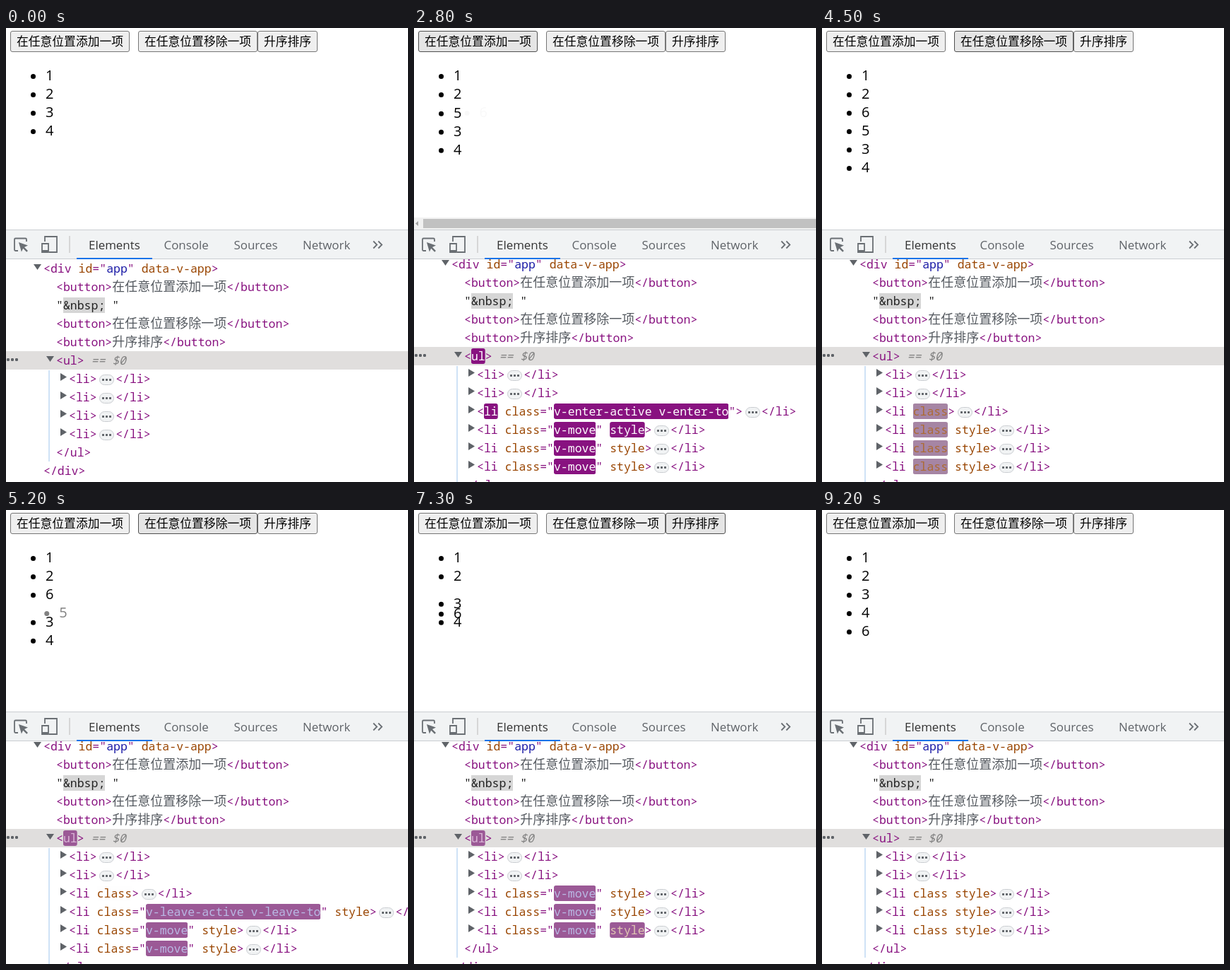
An HTML page that plays this animation: 569x642 px, repeating every 9.5 s.

```html
<!DOCTYPE html>
<html lang="zh">
<head>
<meta charset="utf-8">
<title>List transitions</title>
<style>
html, body { margin: 0; width: 100%; height: 100%; overflow: hidden; background: #fff; }
body { position: relative; }
body * { box-sizing: border-box; }
button, #list div, #bar, #bar span, #tree, .row, .tri, #guide, #scroll, #scroll *, svg { position: absolute; }
button { top: 4px; height: 30px; padding: 0 0 2px; border: 1px solid #767676; border-radius: 3px;
  background: #efefef; color: #000; font: 16.8px/26px "Noto Sans CJK SC", "Noto Sans CJK", sans-serif; white-space: nowrap; }
button.hover { background: #e5e5e5; border-color: #4f4f4f; }
button.down { background: #f5f5f5; border-color: #8d8d8d; }
#list div { left: 56px; height: 26px; font: 20px/26px "Open Sans", "Noto Sans", sans-serif; color: #000; }
#list div::before { content: ""; position: absolute; left: -21px; top: 11px; width: 7px; height: 7px; border-radius: 50%; background: currentColor; }
#scroll { left: 0; top: 268px; width: 569px; height: 17px; background: #f1f1f1; }
#scroll b { left: 13px; top: 2px; width: 556px; height: 13px; background: #c1c1c1; }
#scroll i { left: 2px; top: 5px; width: 4px; height: 7px; background: #a3a3a3; clip-path: polygon(100% 0, 100% 100%, 0 50%); }
#bar { left: 0; top: 285px; width: 569px; height: 42px; background: #f1f3f4; border: solid #cacdd1; border-width: 1px 0; }
#bar span { top: 0; font: 16.9px/41px "Open Sans", "Noto Sans", sans-serif; color: #5f6368; }
#bar span:first-of-type { color: #333; }
#bar svg { left: 0; top: -1px; }
#tree { left: 0; top: 327px; width: 569px; height: 315px; overflow: hidden; }
.row { left: 0; width: 800px; height: 26px; white-space: pre; color: #881280; font: 16.5px/26px "Noto Sans Mono", "DejaVu Sans Mono", monospace; }
.row > * { line-height: 0; }
.row .cjk { font: 300 18px/0 "Noto Sans CJK SC", "Noto Sans CJK", sans-serif; color: #555a60; }
.sel { background: #e0dedd; }
.sel em { color: #808080; }
.attr { color: #994500; }
.val { color: #1a1aa6; }
.txt { color: #222; }
.ent { background: #d6d6d6; clip-path: inset(1px 0 0); }
.mark { clip-path: inset(1px 0 0 round 3px); }
.tri { background: #5f6368; }
.tri.open { margin-left: -14px; top: 7px; width: 11px; height: 8px; clip-path: polygon(0 0, 100% 0, 50% 100%); }
.tri.shut { margin-left: -12px; top: 5px; width: 9px; height: 11px; clip-path: polygon(0 0, 100% 50%, 0 100%); }
.pill { display: inline-block; width: 21px; height: 15px; margin: 0 2px 0 3.5px; padding: 0 2px; vertical-align: -3px;
  border: 1px solid #cacdd1; border-radius: 8px;
  background: radial-gradient(circle, #5f6368 1.3px, transparent 2px) 0 50% / 5px 5px repeat-x content-box, #f1f3f4; }
.more { position: absolute; left: 0; top: 9px; width: 18px; height: 6px; background: radial-gradient(circle, #5f6368 1.9px, transparent 2.5px) 0 0 / 6px 6px; }
#guide { left: 60px; width: 2px; background: #cfe2f6; }
</style>
</head>
<body>
<button style="left:6px;width:169px">在任意位置添加一项</button>
<button style="left:187px;width:169px">在任意位置移除一项</button>
<button style="left:356px;width:85px">升序排序</button>
<div id="list"></div>
<div id="scroll"><i></i><b></b></div>
<div id="bar">
  <svg width="569" height="42" fill="none" stroke="#6a6f74" stroke-width="1.8">
    <path d="M17 30H13.5Q12 30 12 28.500V14Q12 12.500 13.500 12.500H27.500Q29 12.500 29 14V17"/>
    <path d="M18 18l13 4.500-5 2.500 5 5-1.800 1.800-5-5-2.300 4.700z" fill="#6a6f74" stroke="none"/>
    <path d="M55 17V10H72V32H61M51 20H60V32H51z"/>
    <path d="M51 30.500H60" stroke-width="3"/>
    <path d="M90 9V33" stroke="#ccc" stroke-width="1.500"/>
    <path d="M520 16.500l5 5-5 5M527 16.500l5 5-5 5"/>
    <path d="M100 41H207" stroke="#1a73e8" stroke-width="2"/>
  </svg>
  <span style="left:117px">Elements</span>
  <span style="left:223.5px">Console</span>
  <span style="left:322.5px">Sources</span>
  <span style="left:420px">Network</span>
</div>
<div id="tree"></div>
<script>
const LOOP = 9500, STEP = 100, ROW = 26;
const $ = id => document.getElementById(id);
const buttons = [...document.querySelectorAll('button')];
const hovers = [[400, 4200, 700], [4300, 6600, 4900], [6600, 8600, 7000]]; // from, to, press
const colors = { tag: [136, 18, 128], attr: [153, 69, 0], val: [26, 26, 166] };

// cubic-bezier easing, solved by bisection
function bezier(x1, y1, x2, y2) {
  const at = (a, b, s) => 3 * a * s * (1 - s) ** 2 + 3 * b * s * s * (1 - s) + s ** 3;
  return x => {
    if (x <= 0 || x >= 1) return x <= 0 ? 0 : 1;
    let lo = 0, hi = 1;
    for (let i = 0; i < 24; i++) {
      const mid = (lo + hi) / 2;
      if (at(x1, x2, mid) < x) lo = mid; else hi = mid;
    }
    return at(y1, y2, lo);
  };
}
const ease = bezier(.25, .1, .25, 1), easeOut = bezier(0, 0, .2, 1);
const mix = (a, b, p) => a.map((v, i) => Math.round(v + (b[i] - v) * p));

let now = 0;

// text that flashes purple for 1.4 s after it changed at time `since`
function flash(text, kind, since) {
  const age = now - since - 40;
  if (!since || age > 1400 || now >= 9200) return `<span class="${kind}">${text}</span>`;
  const p = easeOut(age / 1120), alpha = 1 - easeOut((age - 1120) / 280);
  const back = mix(colors.tag, [170, 146, 168], p), ink = mix([255, 255, 255], colors[kind], p * p);
  return `<span class="mark" style="background:rgba(${back},${alpha});color:rgb(${ink})">${text}</span>`;
}

// one <li> row: class value, time of the class change, style attribute, time it appeared, time the tag appeared
function li({ cls, at, style, styleAt, born }) {
  let s = '&lt;' + flash('li', 'tag', born);
  if (cls) s += ` <span class="attr">class</span>="${flash(cls, 'val', at)}"`;
  else if (cls === '') s += ' ' + flash('class', 'attr', at);
  if (style) s += ' ' + flash('style', 'attr', styleAt);
  return s + '&gt;<span class="pill"></span>&lt;/li&gt;';
}

const plain = {};
const enter = at => ({ cls: 'v-enter-active v-enter-to', at, born: at });
const leave = at => ({ cls: 'v-leave-active v-leave-to', at, style: true });
const move = (at, styleAt) => ({ cls: 'v-move', at, style: true, styleAt });
const done = (at, born) => ({ cls: '', at, born });
const moved = at => ({ cls: '', at, style: true });

// start, list order, last change of <ul>, rows after the first two
const A = 700, B = 2760, C = 4900, D = 7000;
const phases = [
  [0, '1234', 0, [plain, plain]],
  [A, '12534', A, [enter(A), move(A, A), move(A, A)]],
  [1700, '12534', A, [done(1700, A), moved(1700), moved(1700)]],
  [B, '126534', B, [enter(B), move(B, B), move(B), move(B)]],
  [3800, '126534', B, [done(3800, B), moved(3800), moved(3800), moved(3800)]],
  [C, '12634', C, [done(3800), leave(C), move(C), move(C)]],
  [5900, '12634', 5900, [done(3800), moved(5900), moved(5900)]],
  [D, '12346', D, [move(D), move(D), move(D, D)]],
  [8000, '12346', D, [moved(8000), moved(8000), moved(8000)]],
];

function drawList(prev, next, p) {
  const k = ease(p);
  let html = '';
  for (const n of new Set(prev + next)) {
    const from = prev.indexOf(n), to = next.indexOf(n);
    const shown = from < 0 ? k : to < 0 ? 1 - k : 1;
    if (!shown) continue;
    const a = from < 0 ? to : from, b = to < 0 ? from : to;
    const y = 54 + ROW * (a + (b - a) * k), x = 37.5 * (1 - shown);
    html += `<div style="transform:translate(${x}px,${y}px);opacity:${shown}">${n}</div>`;
  }
  $('list').innerHTML = html;
}

function drawTree(ulAt, items) {
  let y = now < A ? 0 : -6, html = '';
  const row = (x, s, arrow, cls = '') => {
    const tri = arrow ? `<span class="tri ${arrow}"></span>` : '';
    html += `<div class="row ${cls}" style="top:${y}px;padding-left:${x}px">${tri}${s}</div>`;
    y += ROW;
  };
  const button = label => row(71, `&lt;button&gt;<span class="cjk">${label}</span>&lt;/button&gt;`);
  row(53, '&lt;div <span class="attr">id</span>="<span class="val">app</span>" <span class="attr">data-v-app</span>&gt;', 'open');
  button('在任意位置添加一项');
  row(71, '"<span class="ent">&amp;nbsp;</span> "', '', 'txt');
  button('在任意位置移除一项');
  button('升序排序');
  row(71, `<span class="more"></span>&lt;${flash('ul', 'tag', ulAt)}&gt;<em> == $0</em>`, 'open', 'sel');
  const start = y;
  [plain, plain, ...items].forEach(o => row(89, li(o), 'shut'));
  row(71, '&lt;/ul&gt;');
  html += `<div id="guide" style="top:${start + 1}px;height:${y - start - 1}px"></div>`;
  row(53, '&lt;/div&gt;');
  $('tree').innerHTML = html;
}

function draw() {
  const i = phases.findLastIndex(phase => phase[0] <= now);
  const [at, order, ulAt, items] = phases[i];
  const prev = i ? phases[i - 1][1] : order, p = Math.min(1, (now - at) / 1000);
  drawList(prev, order, p);
  drawTree(ulAt, items);
  $('scroll').style.display = order.length > prev.length && p < .92 ? '' : 'none';
  buttons.forEach((b, n) => {
    const [from, to, press] = hovers[n];
    b.className = now === press ? 'down' : now >= from && now < to ? 'hover' : '';
  });
}

let begin, last = -1;
function tick(time) {
  begin ??= time;
  now = Math.floor((time - begin) % LOOP / STEP) * STEP;
  if (now !== last) draw();
  last = now;
  requestAnimationFrame(tick);
}
draw();
requestAnimationFrame(tick);
</script>
</body>
</html>
```
